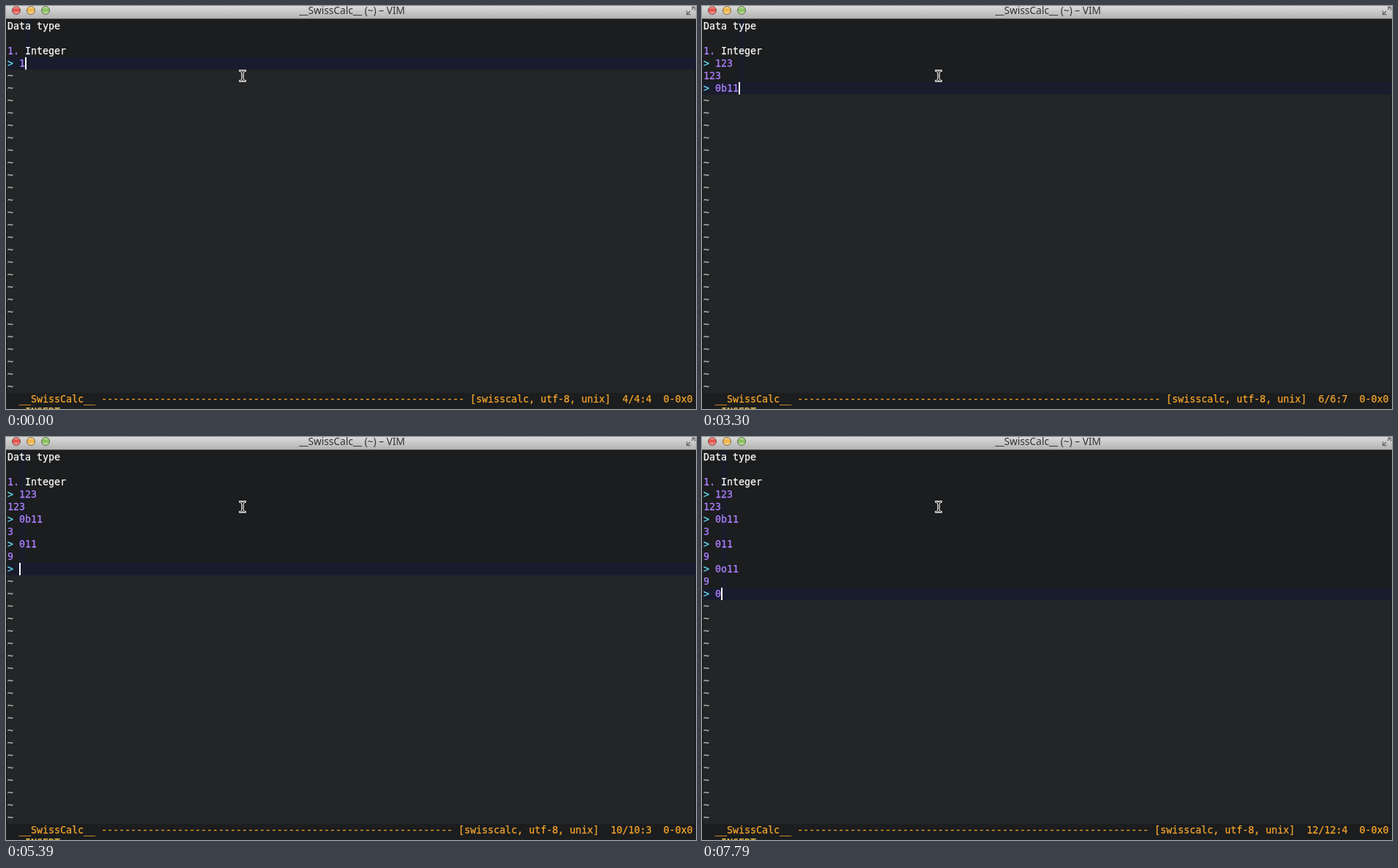
Animation, 942 px wide and 551 px high, one loop 8000 ms. Source, as an HTML page:

```html
<!DOCTYPE html>
<html lang="en">
<head>
<meta charset="utf-8">
<title>Calculator session</title>
<style>
  html, body { margin: 0; width: 100%; height: 100%; overflow: hidden; background: #1b1d1e; }
  #stage { position: relative; width: 942px; height: 551px; overflow: hidden; background: #1b1d1e; }
  #stage > * { position: absolute; }
  pre {
    left: 2px; top: 19px; margin: 0; color: #f8f8f2;
    font: 13.29px/17px "DejaVu Sans Mono", monospace;
    -webkit-text-stroke: .25px currentColor;
  }
  .prompt { color: #66d9ef; }
  .number { color: #ae81ff; }
  .tilde { color: #bcbcbc; }
  .status { color: #f5a52c; }
  .mode { color: #e6c052; }
  #empty { left: 2px; width: 938px; background: #232526; }
  #line { left: 2px; width: 940px; height: 17px; background: #181c2d; }
  #column { top: 18px; width: 8px; background: #191d2a; }
  #cursor { width: 2px; height: 17px; background: #fff; }
  svg { left: 0; top: 0; }
</style>
</head>
<body>
<div id="stage">
  <div id="empty"></div>
  <div id="column"></div>
  <div id="line"></div>
  <pre id="text"></pre>
  <div id="cursor"></div>
  <svg width="942" height="551">
    <defs>
      <linearGradient id="bar" x2="0" y2="1">
        <stop stop-color="#dadada"/><stop offset="1" stop-color="#b3b3b3"/>
      </linearGradient>
      <linearGradient id="gloss" x2="0" y2="1">
        <stop stop-color="#fff" stop-opacity=".5"/>
        <stop offset=".45" stop-color="#fff" stop-opacity="0"/>
        <stop offset="1" stop-color="#fff" stop-opacity=".55"/>
      </linearGradient>
    </defs>
    <rect width="942" height="17" fill="url(#bar)"/>
    <rect y="17" width="942" height="1" fill="#555"/>
    <g stroke="#000" stroke-opacity=".45">
      <circle cx="14" cy="6" r="5.5" fill="#e2483f"/>
      <circle cx="34" cy="6" r="5.5" fill="#eeb03c"/>
      <circle cx="54" cy="6" r="5.5" fill="#83bd55"/>
    </g>
    <g fill="url(#gloss)">
      <circle cx="14" cy="6" r="5"/><circle cx="34" cy="6" r="5"/><circle cx="54" cy="6" r="5"/>
    </g>
    <text x="472.5" y="11" text-anchor="middle" fill="#333"
      font-family="'Noto Sans', sans-serif" font-size="13.7">__SwissCalc__ (~) – VIM</text>
    <path d="M936 5l4-4M936 1.5h4.5v4.5M934 7l-4 4M929.5 6.5v5h5" fill="none" stroke="#666" stroke-width="1.3"/>
    <g fill="none" stroke-linecap="square">
      <path id="beam" d="M320 88.5q3 0 3 3q0-3 3-3M323 91.5v8M320 102.5q3 0 3-3q0 3 3 3" stroke="#eee" stroke-width="3"/>
      <use href="#beam"/>
      <path d="M320 88.5q3 0 3 3q0-3 3-3M323 91.5v8M320 102.5q3 0 3-3q0 3 3 3" stroke="#111"/>
    </g>
  </svg>
</div>
<script>
const DURATION = 8000, ROW = 17, COL = 8, TOP = 19, LEFT = 2, ROWS = 30, COLUMNS = 117;

const keys = [
  [0, '1'], [150, '2'], [300, '3'], [600, '\n'],
  [2850, '0'], [3000, 'b'], [3150, '1'], [3300, '1'], [3600, '\n'],
  [4200, '0'], [5090, '1'], [5240, '1'], [5390, '\n'],
  [5840, '0'], [6140, 'o'], [6440, '1'], [6590, '1'], [6890, '\n'],
  [7790, '0']
];
const cursorHidden = [[1350, 1650], [1950, 2250], [4790, 5090], [7640, 7790]];

const element = id => document.getElementById(id);
const span = (kind, text) => `<span class="${kind}">${text}</span>`;
const evaluate = input => /^0\d/.test(input) ? parseInt(input, 8) : Number(input);
const expression = input =>
  span('prompt', '&gt;') + ' ' + (/^0[bo]$/.test(input) ? input : span('number', input));

function statusLine(row, column) {
  const start = '  __SwissCalc__ ';
  const end = ` [swisscalc, utf-8, unix]  ${row}/${row}:${column}  0-0x0`;
  return start + '-'.repeat(COLUMNS - start.length - end.length) + end;
}

function place(id, box) {
  for (const side in box) element(id).style[side] = box[side] + 'px';
}

let shown = '';

function render(time) {
  const typed = keys.filter(([at]) => at <= time).map(([, key]) => key).join('');
  const hidden = cursorHidden.some(([from, to]) => time >= from && time < to);
  element('cursor').style.visibility = hidden ? 'hidden' : 'visible';
  if (typed === shown) return;
  shown = typed;

  const inputs = typed.split('\n');
  const current = inputs.pop();
  const lines = ['Data type', '', span('number', '1.') + ' Integer'];
  for (const input of inputs) lines.push(expression(input), span('number', evaluate(input)));
  lines.push(expression(current));

  const row = lines.length;
  const top = TOP + ROW * (row - 1);
  const column = current.length + 2;
  const left = LEFT + COL * column;
  while (lines.length < ROWS) lines.push(span('tilde', '~'));
  lines.push(span('status', statusLine(row, column + 1)), span('mode', '-- INSERT --'));

  element('text').innerHTML = lines.join('\n');
  place('empty', { top: top + ROW, height: ROW * (ROWS - row) });
  place('line', { top });
  place('column', { left, height: top - 18 });
  place('cursor', { left, top });
}

let start;
function tick(now) {
  start ??= now;
  render((now - start) % DURATION);
  requestAnimationFrame(tick);
}
render(0);
requestAnimationFrame(tick);
</script>
</body>
</html>
```
